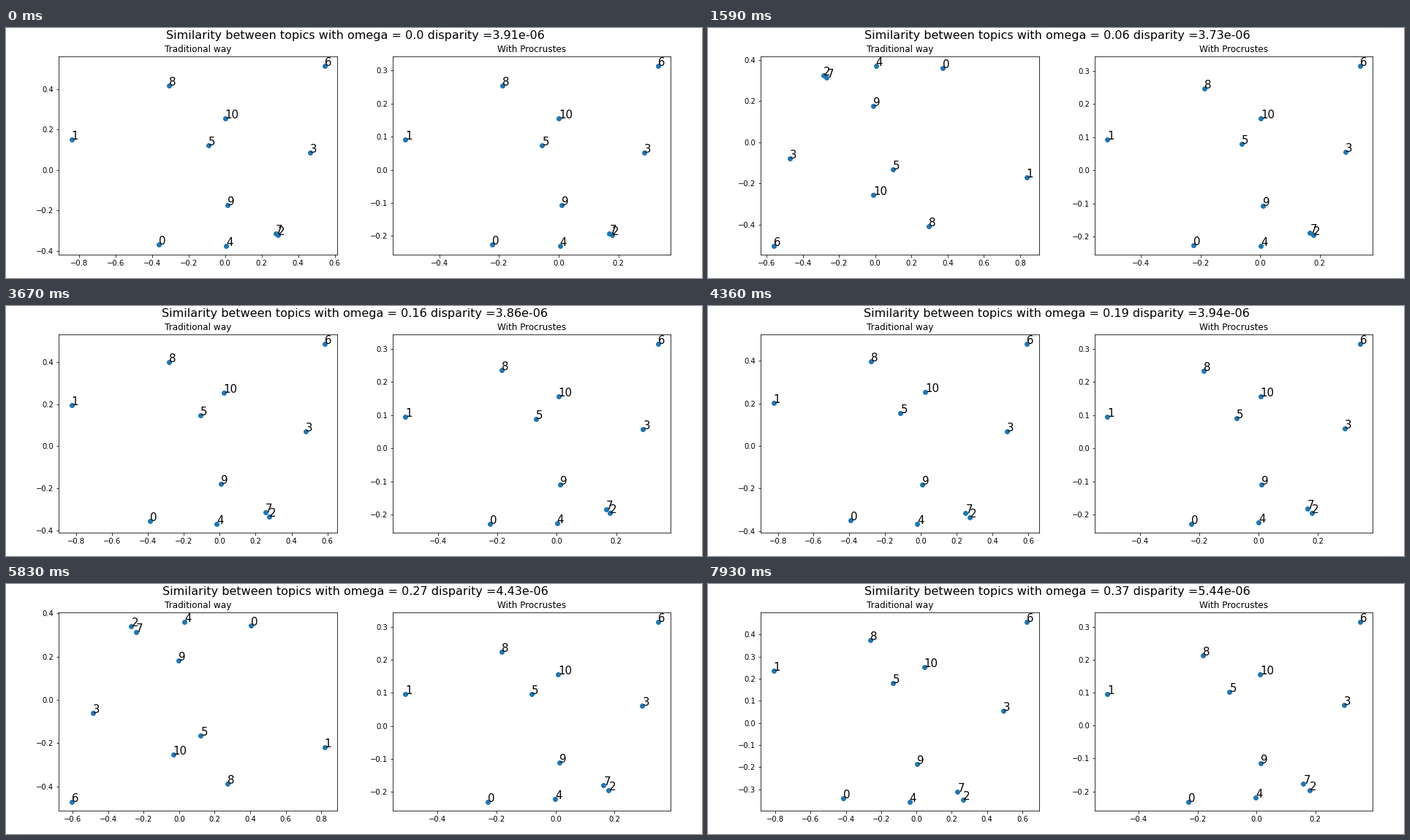
These frames come from a looping animation (952x343 px, 8 s). A matplotlib script:

```python
import numpy as np
import matplotlib.pyplot as plt
from matplotlib.animation import FuncAnimation

W, H, DPI = 952, 343, 72
LOOP, TICK = 8000, 40
LAST = 34

plt.rcParams["font.family"] = "DejaVu Sans"

# Position of each topic and its drift over the loop: x, y, dx, dy
TOPICS = np.array([
    (-.222, -.2246, -.011, -.0065),
    (-.514, .0925, .0065, .004),
    (.178, -.1958, .003, .0005),
    (.286, .0531, .011, .010),
    (.0034, -.2293, -.0064, .010),
    (-.0555, .0751, -.036, .0276),
    (.333, .315, .020, .0005),
    (.1697, -.1915, -.010, .0162),
    (-.1887, .254, .0077, -.041),
    (.0083, -.1058, .005, -.008),
    (.0005, .1565, .0113, 0)])

# Steps run evenly between these times, with a longer hold every eleventh one
CHANGES = np.interp(np.arange(1, LAST + 1),
                    [1, 6, 7, 17, 18, 28, 29, LAST],
                    [500, 1590, 1890, 4060, 4360, 6460, 6780, 7930])
FLIPS = [3, 9, 20, 30]


def aligned(step):
    return (TOPICS[:, :2] + TOPICS[:, 2:] * step / LAST).T


def unaligned(step):
    """The same layout, scaled, slowly turning and sometimes flipped by 180 degrees."""
    a = np.radians(.0016 * step ** 2 - .215 * step)
    sign = (-1) ** np.searchsorted(FLIPS, step, side="right")
    c, s = np.cos(a), np.sin(a)
    return 1.634 * sign * np.array([[c, -s], [s, c]]) @ aligned(step)


def heading(step):
    omega = round(step * .01078, 2)
    disparity = np.interp(step, [0, 6, 11, 18, 22, 28, LAST],
                          [3.91, 3.73, 3.75, 3.94, 4.2, 4.65, 5.44])
    return f"Similarity between topics with omega = {omega} disparity ={disparity * 1e-6:.3g}"


class Panel:
    def __init__(self, fig, left, title, layout):
        self.ax = fig.add_axes([left / W, 31.9 / H, 380.45 / W, 271.8 / H])
        self.ax.set_title(title, fontsize=12)
        self.layout = layout
        self.dots = self.ax.scatter(*layout(0))
        self.labels = [self.ax.text(0, 0, str(i), fontsize=15) for i in range(len(TOPICS))]

    def show(self, step):
        xy = self.layout(step)
        self.dots.set_offsets(xy.T)
        for label, pos in zip(self.labels, xy.T):
            label.set_position(pos)
        low, high = xy.min(axis=1), xy.max(axis=1)
        pad = .05 * (high - low)
        self.ax.set_xlim(low[0] - pad[0], high[0] + pad[0])
        self.ax.set_ylim(low[1] - pad[1], high[1] + pad[1])


fig = plt.figure(figsize=(W / DPI, H / DPI), dpi=DPI, facecolor="white")
panels = [Panel(fig, 72.4, "Traditional way", unaligned),
          Panel(fig, 528.94, "With Procrustes", aligned)]
head = fig.text(477.4 / W, 1 - 2.6 / H, "", fontsize=16, ha="center", va="top")


def update(frame):
    t = frame * TICK + TICK - 1
    step = int(np.searchsorted(CHANGES, t, side="right"))
    for panel in panels:
        panel.show(step)
    head.set_text(heading(step))
    return []


anim = FuncAnimation(fig, update, frames=LOOP // TICK, interval=TICK,
                     repeat=True, repeat_delay=0, blit=False)
plt.show()
```
